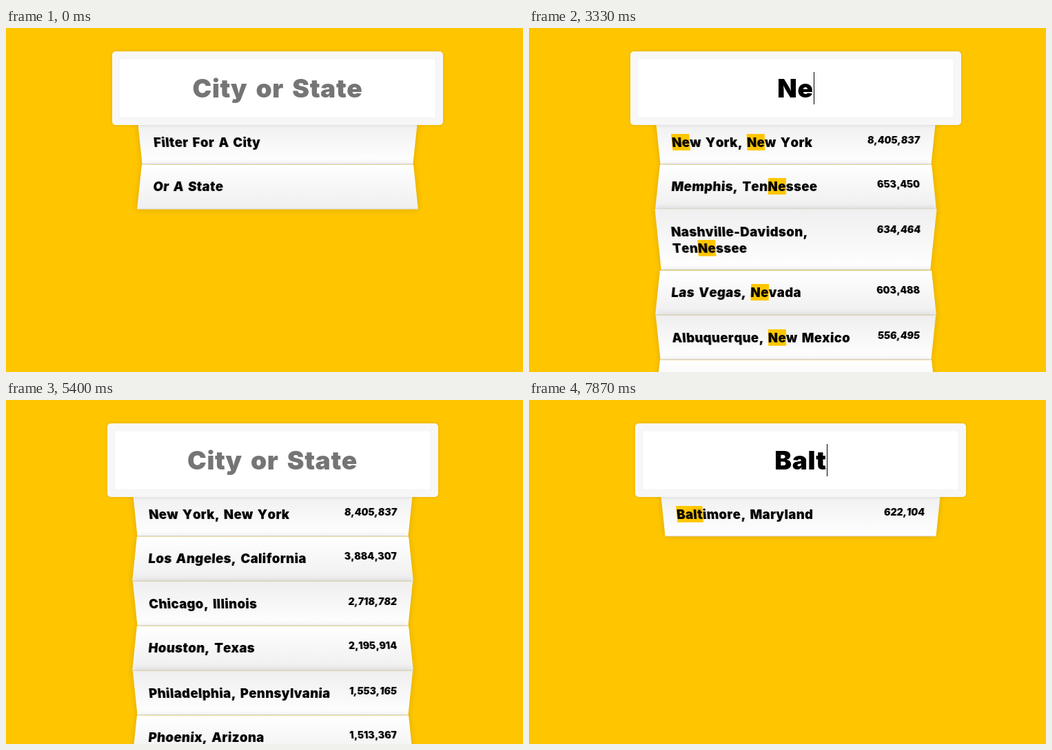
Animation of 750x500 px, one loop 8000 ms. Source, as an HTML page:

```html
<!DOCTYPE html>
<html lang="en">
<head>
<meta charset="utf-8">
<title>Type ahead</title>
<style>
* { box-sizing: border-box; }
html, body { margin: 0; width: 100%; height: 100%; overflow: hidden; background: #ffc600; }
body { position: relative; font: 900 18.6px/24px Inter, "Open Sans", sans-serif; font-kerning: none; color: #000; }

.form { position: absolute; left: 194px; top: 0; width: 400px; }
.form.long { left: 186.5px; }
.search, .name { letter-spacing: .016em; word-spacing: .115em; }

.search {
  position: absolute; z-index: 2; left: -40px; top: 34px; width: 480px; height: 107px;
  padding: 20px; display: flex; justify-content: center;
  background: #fff; border: 10px solid #f7f7f7; border-radius: 5px;
  box-shadow: 0 0 5px rgba(0,0,0,.12), inset 0 0 2px rgba(0,0,0,.19);
  font-size: 37.2px; line-height: 47px; white-space: pre;
}
.hint { position: absolute; left: 0; right: 0; text-align: center; color: #757575; }
.value { position: relative; height: 47px; }
.caret { position: absolute; left: 100%; top: 0; width: 1px; height: 47px; background: #000; }

.list { position: absolute; top: 131px; left: 0; width: 100%; margin: 0; padding: 0; }
.list li {
  display: flex; justify-content: space-between; list-style: none; padding: 20px;
  border-bottom: 1px solid #d8d8d8; box-shadow: 0 0 10px rgba(0,0,0,.14);
}
.list li:nth-child(even) {
  transform: perspective(100px) rotateX(3deg) translateY(2px) scale(1.001);
  background: linear-gradient(to bottom, #fff, #efefef);
}
.list li:nth-child(odd) {
  transform: perspective(100px) rotateX(-3deg) translateY(3px);
  background: linear-gradient(to top, #fff, #efefef);
}
.count { font-size: 14px; line-height: 18px; }
.hl { background: #ffc600; padding: 1px 0; }
</style>
</head>
<body>
<div class="form">
  <div class="search">
    <span class="hint">City or State</span>
    <span class="value"><span class="text"></span><i class="caret"></i></span>
  </div>
  <ul class="list"></ul>
</div>
<script>
const LOOP = 8000, FOCUS = 930, BLINK = 500, ROWS = 6;

// sorted by population
const places = [
  ['New York, New York', 8405837],
  ['Los Angeles, California', 3884307],
  ['Chicago, Illinois', 2718782],
  ['Houston, Texas', 2195914],
  ['Philadelphia, Pennsylvania', 1553165],
  ['Phoenix, Arizona', 1513367],
  ['Columbus, Ohio', 822553],
  ['Memphis, Tennessee', 653450],
  ['Washington, District Of Columbia', 646449],
  ['Boston, Massachusetts', 645966],
  ['Nashville-Davidson, Tennessee', 634464],
  ['Baltimore, Maryland', 622104],
  ['Las Vegas, Nevada', 603488],
  ['Albuquerque, New Mexico', 556495],
  ['Omaha, Nebraska', 434353],
  ['New Orleans, Louisiana', 378715],
  ['Bakersfield, California', 363630],
  ['Newark, New Jersey', 278427],
  ['Buffalo, New York', 258959],
  ['Jersey City, New Jersey', 257342],
  ['Baton Rouge, Louisiana', 229426],
  ['Birmingham, Alabama', 212113],
  ['Montgomery, Alabama', 201332],
  ['Mobile, Alabama', 194899],
  ['Baldwin Park, California', 76635]
];

// [time, text in the field]
const typed = [
  [0, ''], [1800, 'N'], [2270, 'Ne'], [2330, 'New'], [3000, 'Ne'], [4070, 'N'],
  [4800, ''], [5670, 'B'], [6330, 'Ba'], [6600, 'Bal'], [6870, 'Balt']
];
// [time, query applied to the list]; null shows the intro rows
const queries = [
  [0, null], [2270, 'N'], [2330, 'Ne'], [2400, 'New'], [3070, 'Ne'], [4130, 'N'],
  [4870, ''], [5800, 'B'], [6400, 'Ba'], [6670, 'Bal'], [6930, 'Balt']
];

const $ = s => document.querySelector(s);
const form = $('.form'), hint = $('.hint'), text = $('.text'), caret = $('.caret'), list = $('.list');
const at = (steps, t) => steps.filter(s => s[0] <= t).pop();
const row = (name, count = '') =>
  `<li><span class="name">${name}</span><span class="count">${count}</span></li>`;

function mark(name, query) {
  return query ? name.replace(new RegExp(query, 'gi'), `<span class="hl">${query}</span>`) : name;
}

function showList(query) {
  if (query === null) {
    list.innerHTML = row('Filter For A City') + row('Or A State');
    form.classList.remove('long');
    return;
  }
  const found = places.filter(p => p[0].toLowerCase().includes(query.toLowerCase())).slice(0, ROWS);
  list.innerHTML = found.map(([name, n]) => row(mark(name, query), n.toLocaleString('en-US'))).join('');
  form.classList.toggle('long', found.length === ROWS);
}

let shown;
function draw(now) {
  const t = now % LOOP;
  const [since, value] = at(typed, t);
  const query = at(queries, t)[1];
  if (query !== shown) showList(shown = query);
  text.textContent = value;
  hint.hidden = value !== '';
  const age = t - (since || FOCUS);
  caret.hidden = age < 0 || Math.floor(age / BLINK) % 2 === 1;
}

const start = performance.now();
function tick() {
  draw(performance.now() - start);
  requestAnimationFrame(tick);
}
tick();
</script>
</body>
</html>
```
